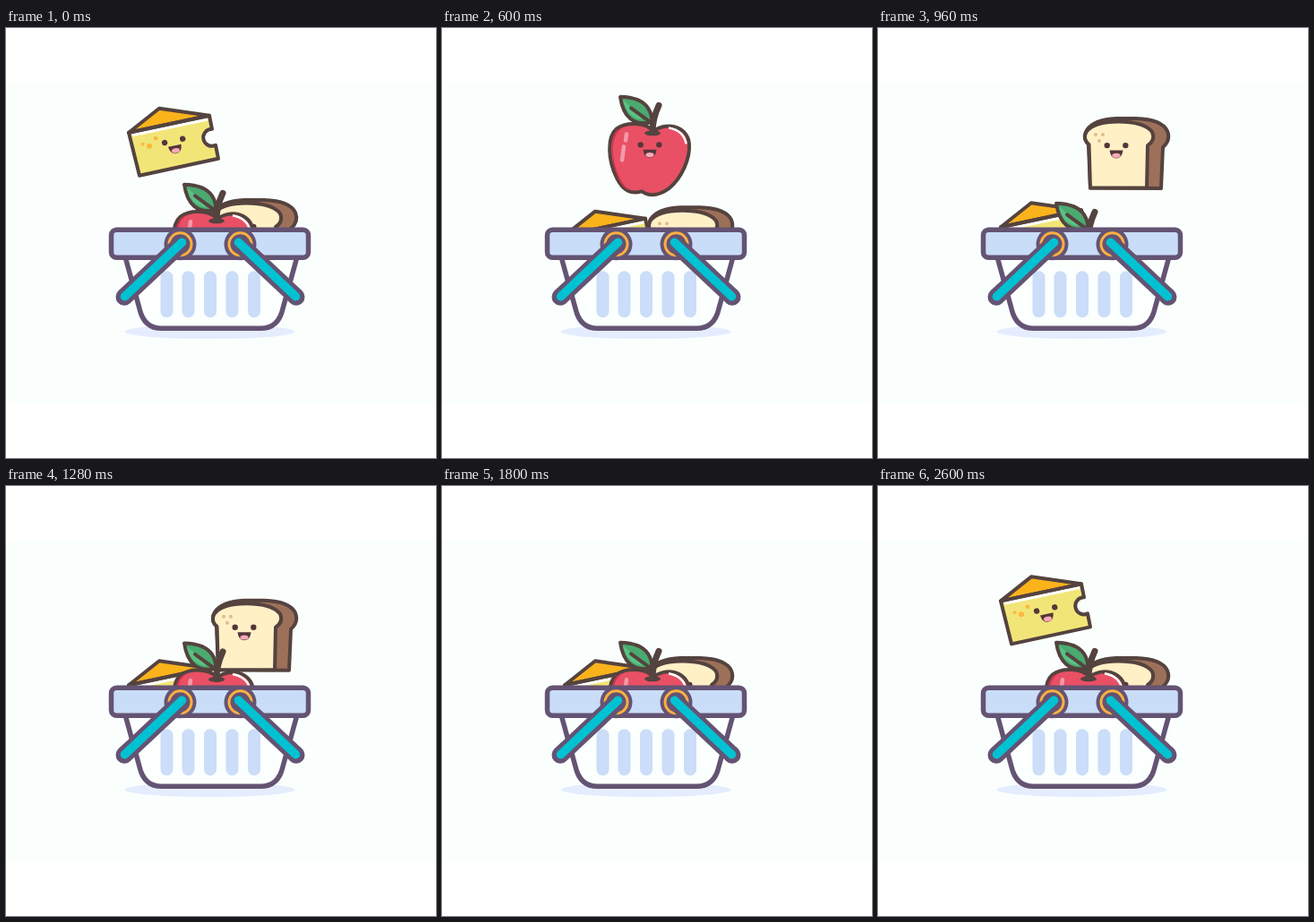
These frames come from a looping animation (480x480 px, 2640 ms). An HTML page:

```html
<!DOCTYPE html>
<html lang="en">
<head>
<meta charset="utf-8">
<title>Grocery basket</title>
<style>
  html, body { margin: 0; width: 100%; height: 100%; overflow: hidden; background: #fff; }
  svg { display: block; width: 100%; height: 100%; }
  .ink { stroke: #54433f; stroke-width: 4; stroke-linejoin: round; stroke-linecap: round; }
  .rim { stroke: #645373; stroke-width: 5.5; stroke-linejoin: round; }
</style>
</head>
<body>
<svg viewBox="0 0 480 480">
  <defs>
    <g id="face">
      <circle cx="-10.300" cy="-4" r="3.200" fill="#54363a"/>
      <circle cx="10.300" cy="-4" r="3.200" fill="#54363a"/>
      <path d="M-7.500 1.500H7.500Q6.500 10.500 0 10.500T-7.500 1.500Z" fill="#54363a"/>
      <ellipse cy="7.200" rx="4.600" ry="2.600" fill="#f7a9b8"/>
    </g>
    <g id="handle">
      <circle cx="194.500" cy="242" r="18" fill="#645373"/>
      <circle cx="194.500" cy="242" r="12.500" fill="none" stroke="#fbb040" stroke-width="3"/>
      <g fill="none" stroke-linecap="round">
        <path d="M195 242L132 301" stroke="#645373" stroke-width="19"/>
        <path d="M196.500 240L132.500 300.500" stroke="#00c2d3" stroke-width="9.500"/>
      </g>
    </g>
  </defs>

  <rect y="60" width="480" height="360" fill="#fafffe"/>
  <ellipse cx="227.500" cy="339" rx="95" ry="8" fill="#e4ecfd"/>

  <g id="cheese">
    <path d="M137 116L227 97L230 112A9.500 9.500 0 1 0 234 130L237 145L149 164Z" fill="#f2e578"/>
    <path d="M141 118.500L225 100.700" stroke="#fff" stroke-width="4"/>
    <path class="ink" d="M171 89L227 97L137 116Z" fill="#fbb31c"/>
    <path class="ink" d="M137 116L227 97L230 112A9.500 9.500 0 1 0 234 130L237 145L149 164Z" fill="none"/>
    <g fill="#fbb83c">
      <circle cx="160" cy="131" r="3"/><circle cx="167" cy="122.500" r="2.300"/><circle cx="152.500" cy="129" r="2"/>
    </g>
    <use href="#face" transform="translate(188 129) rotate(-12)"/>
  </g>

  <g id="bread">
    <path class="ink" d="M237 177.500L235 129Q228 121 233 113Q241 101 266 100H288Q317 101 323 114Q327 124 318 132L316 178Z" fill="#9d7059"/>
    <path class="ink" d="M237 177.500L235.500 129Q228 123 232.500 115Q241 103.500 268 103.500Q297 103.500 306 115Q310 124 301 130L300 177.500Z" fill="#fff0c6"/>
    <g fill="#dcbd90">
      <circle cx="243" cy="118" r="2"/><circle cx="251" cy="118" r="2"/><circle cx="247" cy="125" r="2"/>
    </g>
    <use href="#face" transform="translate(266 134)"/>
  </g>

  <g id="apple">
    <path class="ink" d="M236 118C228 108 206 107 195 115C184 124 185 150 195 170C203 186 212 188 223 185C233 192 243 189 253 182C268 170 277 148 276 132C274 111 249 107 236 118Z" fill="#e95065"/>
    <path d="M204 113C184 120 188 162 208 184C190 174 185 128 195 117Z" fill="#d92f4c"/>
    <path d="M206 121L205 128M203 135L201 150" stroke="#f59aa8" stroke-width="4.500" stroke-linecap="round"/>
    <path d="M253 114Q270 117 272.500 132" fill="none" stroke="#fff" stroke-width="2.500"/>
    <ellipse cx="235" cy="120" rx="9" ry="3" fill="#54433f"/>
    <path d="M235 119Q235 104 242 89" fill="none" stroke="#54433f" stroke-width="7" stroke-linecap="round"/>
    <path class="ink" d="M199 79.500Q222 80 230 92Q235 100 234 108Q204 114 199 79.500Z" fill="#4aaa6f"/>
    <path d="M202 83Q206 103 224 105L211 91Z" fill="#5cc184"/>
    <path class="ink" d="M211 92L233 108" stroke-width="3"/>
    <use href="#face" transform="translate(232 137)"/>
  </g>

  <g transform="translate(0 -.7)">
    <path class="rim" d="M133 256L149 314Q154 336 174 336H284Q304 336 309 314L325 256Z" fill="#fbfffe"/>
    <path d="M179.500 279V317M203.500 279V317M228 279V317M252.500 279V317M277 279V317" stroke="#cbddf8" stroke-width="14" stroke-linecap="round"/>
    <rect class="rim" x="117.500" y="226" width="220" height="31" rx="6" fill="#c9dcf8"/>
    <use href="#handle"/>
    <use href="#handle" transform="matrix(-1 0 0 1 456 0)"/>
  </g>
</svg>
<script>
  const LOOP = 2640, DIP = 21, PEAK = -107;

  // rest: shift from drawn place to resting place; keys: [ms, offset from rest]
  const items = [
    { id: 'cheese', rest: 106.3, keys: [[-500, 0], [-270, DIP], [20, PEAK], [370, DIP], [800, 0]] },
    { id: 'apple', rest: 95.3, keys: [[20, 0], [310, DIP], [660, PEAK], [960, DIP], [1320, 0]] },
    { id: 'bread', rest: 92, keys: [[510, 0], [720, DIP], [1032, PEAK], [1125, PEAK], [1520, DIP], [1800, 0]] }
  ].map(item => ({ ...item, node: document.getElementById(item.id) }));

  function offsetAt(keys, t) {
    const next = keys.findIndex(key => key[0] > t);
    if (next < 1) return 0;
    const [t0, y0] = keys[next - 1], [t1, y1] = keys[next];
    const eased = (1 - Math.cos(Math.PI * (t - t0) / (t1 - t0))) / 2;
    return y0 + (y1 - y0) * eased;
  }

  function draw(now) {
    let t = Math.floor((now % LOOP) / 40) * 40;
    if (t > 2000) t -= LOOP;
    for (const { node, rest, keys } of items) {
      node.setAttribute('transform', `translate(0 ${rest + offsetAt(keys, t)})`);
    }
  }

  const start = performance.now();
  function tick() {
    draw(performance.now() - start);
    requestAnimationFrame(tick);
  }
  tick();
</script>
</body>
</html>
```
